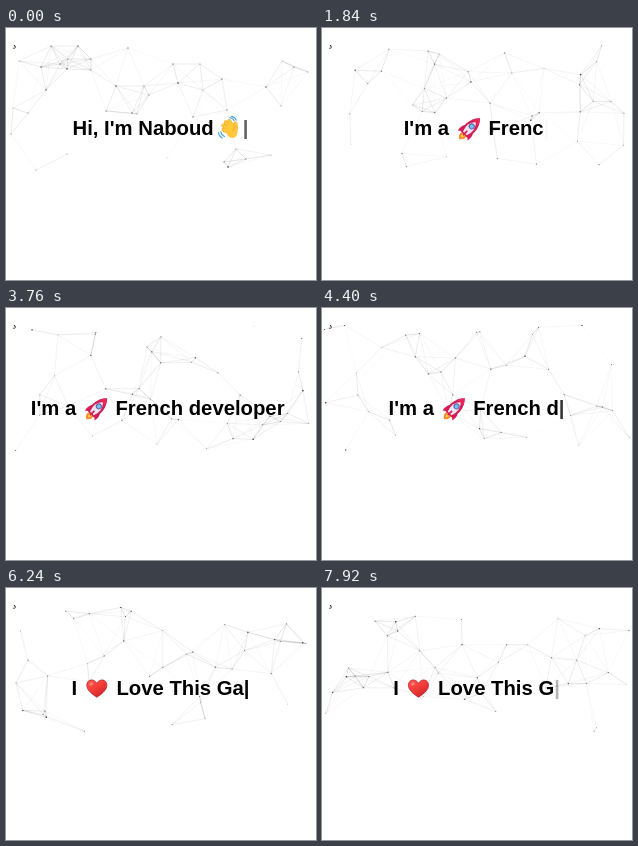
An HTML page with a canvas for the animation above (8000 ms loop, 310 by 252 pixels).

```html
<!DOCTYPE html>
<html lang="en">
<head>
<meta charset="utf-8">
<title>Typed greeting</title>
<style>
  html, body { margin: 0; width: 100%; height: 100%; overflow: hidden; background: #fff; }
  canvas { display: block; width: 310px; height: 252px; }
</style>
</head>
<body>
<canvas id="stage"></canvas>
<script>
const W = 310, H = 252, LOOP = 8000, TICK = 80;
const canvas = document.getElementById('stage');
const dpr = window.devicePixelRatio || 1;
canvas.width = W * dpr;
canvas.height = H * dpr;
const ctx = canvas.getContext('2d');
ctx.scale(dpr, dpr);

const SIZE = 20.3;
const FONT = `bold ${SIZE}px "Liberation Sans", Arial, sans-serif`;
const MID = 154.5;

// ---- Particle network ----
const BOX = { x: 2, y: 17, w: 306, h: 127 };
const LINK = 49;
const starts = [
  [13, 33], [45, 18], [35, 39], [54, 36], [61, 41], [62, 31], [72, 18], [85, 31],
  [85, 42], [40, 62], [7, 80], [22, 85], [61, 126], [30, 142], [5, 106], [122, 20],
  [110, 58], [100, 83], [126, 85], [138, 58], [143, 67], [131, 86], [167, 36], [194, 36],
  [172, 55], [197, 62], [216, 51], [187, 89], [221, 82], [161, 130], [276, 33], [288, 39],
  [302, 44], [260, 59], [275, 78], [218, 134], [222, 139], [230, 121], [265, 127], [240, 131]
];

let seed = 7;
function rand() {
  seed = (seed * 16807) % 2147483647;
  return seed / 2147483647;
}

const dots = starts.map(([x, y]) => ({
  x, y,
  vx: (rand() - 0.5) * 52,
  vy: (rand() - 0.5) * 52,
  r: 0.35 + rand() * 0.45,
  a: 0.4 + rand() * 0.4
}));

const wrap = (v, from, size) => from + ((((v - from) % size) + size) % size);

function disc(x, y, r) {
  ctx.beginPath();
  ctx.arc(x, y, r, 0, Math.PI * 2);
  ctx.fill();
}

function drawNetwork(sec) {
  const pts = dots.map(d => ({
    x: wrap(d.x + d.vx * sec, BOX.x, BOX.w),
    y: wrap(d.y + d.vy * sec, BOX.y, BOX.h),
    r: d.r, a: d.a
  }));
  ctx.save();
  ctx.beginPath();
  ctx.rect(BOX.x, BOX.y, BOX.w, BOX.h);
  ctx.clip();
  ctx.lineWidth = 0.4;
  pts.forEach((p, i) => {
    for (const q of pts.slice(i + 1)) {
      const d = Math.hypot(p.x - q.x, p.y - q.y);
      if (d >= LINK) continue;
      ctx.strokeStyle = `rgba(0,0,0,${0.06 + 0.3 * (1 - d / LINK)})`;
      ctx.beginPath();
      ctx.moveTo(p.x, p.y);
      ctx.lineTo(q.x, q.y);
      ctx.stroke();
    }
    ctx.fillStyle = `rgba(0,0,0,${p.a})`;
    disc(p.x, p.y, p.r);
  });
  ctx.fillStyle = '#222';
  [[8.5, 17.8], [9.3, 19], [8, 20.2]].forEach(([x, y]) => disc(x, y, 0.7));
  ctx.restore();
}

// ---- Emoji, drawn around their own centre ----
function shape(d, fill) {
  ctx.fillStyle = fill;
  ctx.fill(new Path2D(d));
}

function stroke(d, color, width) {
  ctx.strokeStyle = color;
  ctx.lineWidth = width;
  ctx.stroke(new Path2D(d));
}

function drawHeart() {
  const outline = 'M0 8.8 C-4 6.2 -10 2 -10 -3.2 C-10 -9.2 -2.8 -10.4 0 -5 C2.8 -10.4 10 -9.2 10 -3.2 C10 2 4 6.2 0 8.8Z';
  const g = ctx.createLinearGradient(-6, -9, 5, 9);
  g.addColorStop(0, '#ff5a4f');
  g.addColorStop(0.5, '#f23b36');
  g.addColorStop(1, '#c9222b');
  shape(outline, g);
  stroke(outline, '#b5202c', 0.8);
  ctx.save();
  ctx.translate(-5.4, -4.4);
  ctx.rotate(-0.6);
  ctx.scale(1.6, 1);
  ctx.fillStyle = 'rgba(255,170,160,.7)';
  disc(0, 0, 1.2);
  ctx.restore();
}

function drawRocket() {
  ctx.save();
  ctx.rotate(Math.PI / 4);
  shape('M-2.8 8 Q-4.5 12 0 15 Q4.5 12 2.8 8Z', '#ff8a2b');
  shape('M-1.4 8 Q-2 11 0 12.5 Q2 11 1.4 8Z', '#ffd04a');
  shape('M-4 -1 Q-8.5 3 -7 10 L-3 7Z M4 -1 Q8.5 3 7 10 L3 7Z', '#d81b50');
  shape('M0 -14.5 Q9.5 -4 4 8.5 L-4 8.5 Q-9.5 -4 0 -14.5Z', '#cf1f55');
  shape('M0 -9 Q6.5 -2 2.6 7 L-2.6 7 Q-6.5 -2 0 -9Z', '#eee6f2');
  shape('M0 -14.5 Q3.6 -10.5 4.6 -7.2 Q0 -9.2 -4.6 -7.2 Q-3.6 -10.5 0 -14.5Z', '#e5295c');
  ctx.fillStyle = '#6a4a9c';
  disc(0, -2.8, 3);
  ctx.fillStyle = '#6cc5f2';
  disc(0, -2.8, 2.1);
  stroke('M0 3.5 V9.5', '#d81b50', 1.7);
  ctx.restore();
}

function drawWave() {
  ctx.lineCap = 'round';
  const fingers = 'M1 4 L-4.3 1.3 M2 2 L-4.6 -3 M4 1 L-2.2 -6.2 M6 0 L1.4 -7.3 M7.2 3 Q8.6 -1 7.6 -5';
  stroke(fingers, '#e89b1c', 3.8);
  stroke(fingers, '#ffc83a', 3);
  shape('M-1.5 4 Q1 -3 6.5 -3 Q11 1 9.2 6 Q7 10.6 2.6 9.2 Q-0.6 7.5 -1.5 4Z', '#ffc83a');
  stroke('M7.6 -2.5 Q6 0 4.6 2.6', '#e89b1c', 0.7);
  stroke('M1.8 -10.6 Q5 -10.4 6.3 -7.6 M3.6 -12 Q7.4 -11.2 8.4 -8.2', '#4aa3dc', 1.1);
  stroke('M-7 3.4 Q-6.6 6.8 -3.4 8.2 M-9.4 4 Q-9 8 -5.6 9.6', '#4aa3dc', 1.1);
}

// adv: advance width, dx: centre from the left edge of the advance
const emoji = {
  '👋': { adv: 23.4, dx: 8.5, draw: drawWave },
  '🚀': { adv: 28, dx: 15, draw: drawRocket },
  '❤': { adv: 28, dx: 14, draw: drawHeart }
};

// ---- Typewriter ----
const phrases = [
  { text: "Hi, I'm Naboud 👋", from: -LOOP, pace: 50, erase: 100 },
  { text: "I'm a 🚀 French developer", from: 1130, pace: 51, erase: 3880 },
  { text: 'I ❤ Love This Game', from: 5380, pace: 53, erase: 7730 }
];
const ERASE_PACE = 60;

function typedAt(t) {
  const p = phrases.filter(q => t >= q.from).pop();
  const chars = [...p.text];
  let n = Math.min(chars.length, Math.floor((t - p.from) / p.pace));
  if (t >= p.erase) n = chars.length - Math.floor((t - p.erase) / ERASE_PACE);
  return chars.slice(0, Math.max(0, n));
}

// CSS "ease": cubic-bezier(.25, .1, .25, 1)
function ease(x) {
  const bez = (a, b, u) => 3 * a * u * (1 - u) ** 2 + 3 * b * u * u * (1 - u) + u ** 3;
  let lo = 0, hi = 1;
  for (let i = 0; i < 20; i++) {
    const u = (lo + hi) / 2;
    if (bez(0.25, 0.25, u) < x) lo = u; else hi = u;
  }
  return bez(0.1, 1, lo);
}

function cursorAlpha(t) {
  const p = ((t + 180) % 1000) / 500;
  return p < 1 ? ease(p) : 1 - ease(p - 1);
}

function splitRuns(chars) {
  const runs = [];
  let text = '';
  for (const c of chars) {
    if (emoji[c]) {
      runs.push(text, c);
      text = '';
    } else text += c;
  }
  runs.push(text);
  return runs;
}

function drawLine(t) {
  ctx.font = FONT;
  const runs = splitRuns(typedAt(t));
  const width = s => emoji[s] ? emoji[s].adv : ctx.measureText(s).width;
  const base = runs.length > 1 ? 107 : 106;
  const total = runs.reduce((sum, s) => sum + width(s), width('|'));
  let x = MID - total / 2;
  ctx.fillStyle = '#000';
  for (const s of runs) {
    if (emoji[s]) {
      ctx.save();
      ctx.translate(x + emoji[s].dx, 100.4);
      emoji[s].draw();
      ctx.restore();
    } else ctx.fillText(s, x, base);
    x += width(s);
  }
  ctx.globalAlpha = cursorAlpha(t);
  ctx.fillText('|', x, base);
  ctx.globalAlpha = 1;
}

const begin = performance.now();
function render() {
  const now = (performance.now() - begin) % LOOP;
  const t = now - now % TICK;
  ctx.fillStyle = '#fff';
  ctx.fillRect(0, 0, W, H);
  drawNetwork(t / 1000);
  drawLine(t);
  requestAnimationFrame(render);
}
render();
</script>
</body>
</html>
```
